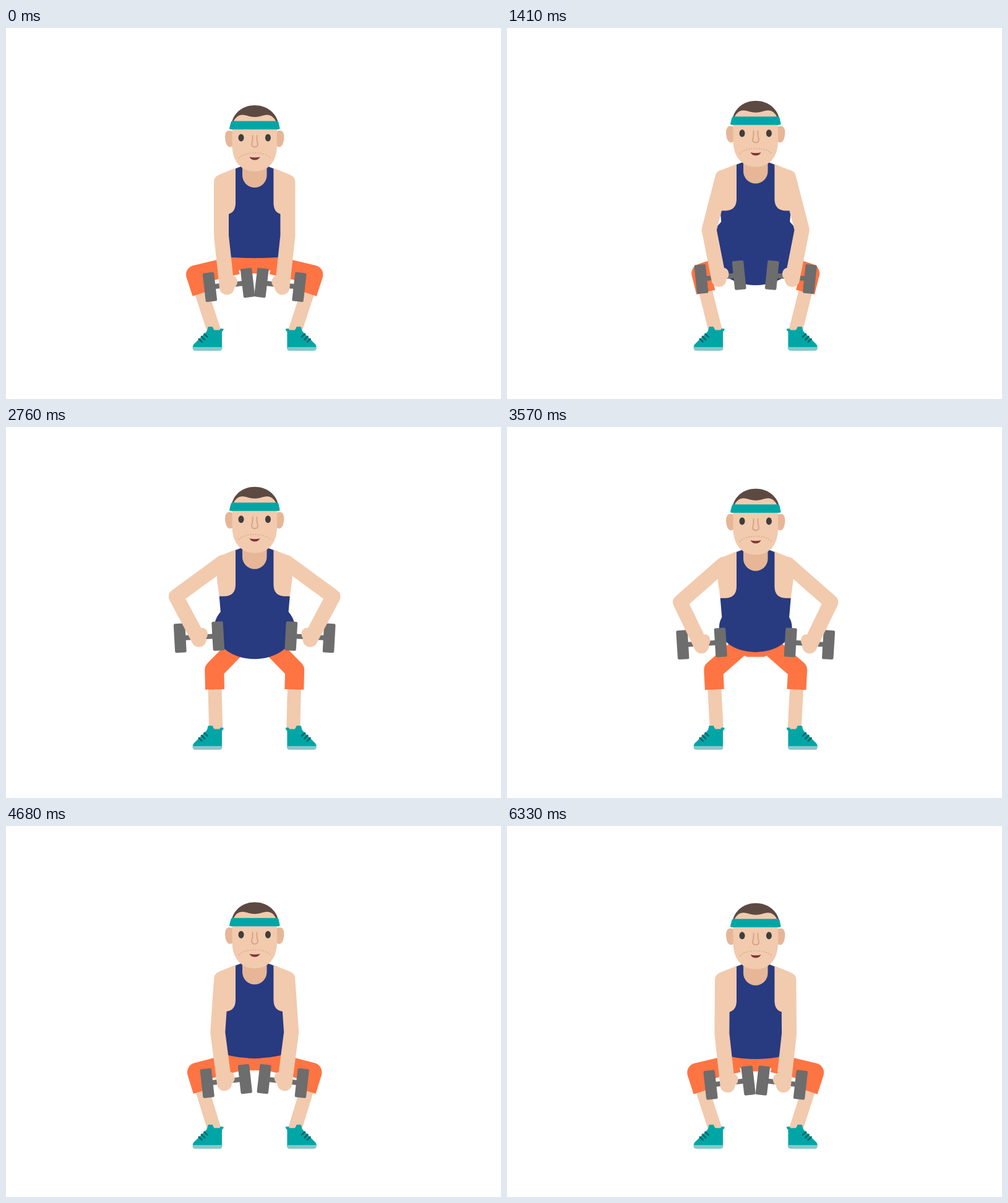
An HTML page with a canvas that plays this animation: 800 by 600 pixels, repeating every 6360 ms.

```html
<!DOCTYPE html>
<html lang="en">
<head>
<meta charset="utf-8">
<title>Squat and row</title>
<style>
html, body { margin: 0; width: 100%; height: 100%; overflow: hidden; background: #fff; }
canvas { display: block; }
</style>
</head>
<body>
<canvas id="stage" width="800" height="600"></canvas>
<script>
const ctx = document.getElementById('stage').getContext('2d');
const LOOP = 6360, REP = LOOP / 4, STEP = 30, AXIS = 401.7;
const SKIN = '#f2caae', SHADE = '#e6b697', NAVY = '#283a80', ORANGE = '#ff7443',
      TEAL = '#00a6a6', GREY = '#6d6d6d', HAIR = '#5c4a42';

// Eased 0 to 1 between times a and b
const ease = (t, a, b) => (1 - Math.cos(Math.PI * Math.min(1, Math.max(0, (t - a) / (b - a))))) / 2;
// Parabola through three poses: up (p = 0), middle (0.5), down (1)
const pose = (p, [up, mid, down]) =>
  up * (1 - p) * (1 - 2 * p) + mid * 4 * p * (1 - p) + down * p * (2 * p - 1);
const point = (p, xs, ys) => [pose(p, xs), pose(p, ys)];

function fill(color, path) {
  ctx.fillStyle = color;
  ctx.fill(new Path2D(path));
}
function stroke(color, width, path, cap = 'round') {
  ctx.strokeStyle = color;
  ctx.lineWidth = width;
  ctx.lineCap = cap;
  ctx.lineJoin = 'round';
  ctx.stroke(new Path2D(path));
}
function ellipse(color, x, y, rx, ry) {
  ctx.fillStyle = color;
  ctx.beginPath();
  ctx.ellipse(x, y, rx, ry, 0, 0, 7);
  ctx.fill();
}
function box(color, x, y, w, h, r) {
  ctx.fillStyle = color;
  ctx.beginPath();
  ctx.roundRect(x, y, w, h, r);
  ctx.fill();
}
const line = (...points) => 'M' + points.join('L');

function shifted(dy, draw) {
  ctx.save();
  ctx.translate(0, dy);
  draw();
  ctx.restore();
}
function bothSides(draw) {
  draw();
  ctx.save();
  ctx.translate(2 * AXIS, 0);
  ctx.scale(-1, 1);
  draw();
  ctx.restore();
}

function leg(p, drop) {
  const hip = [374, 334 + drop];
  const knee = point(p, [357, 334, 306.5], [396, 393, 399]);
  const ankle = [341 - 4 * p, 492];
  const dx = ankle[0] - knee[0], dy = ankle[1] - knee[1], k = 31.5 / Math.hypot(dx, dy);
  const hem = [knee[0] + dx * k, knee[1] + dy * k];
  stroke(SKIN, 22, line(knee, ankle), 'butt');
  stroke(ORANGE, 31, line(hip, knee, hem), 'butt');
}

function shoe() {
  fill(TEAL, 'M302 517Q301 513 306 509L321 494Q326 490 326 485Q326 483 328 483H333Q334.5 483 334.5 485L336.5 488.5H345L347 486L351.5 486.5Q352 489 349 491V517Z');
  fill('#86c8ca', 'M301.5 516H349.5V518Q349 522 345 522H306Q302 522 301.5 518Z');
  stroke('#10666c', 2.8, 'M311.8 503L316.5 507.5M316 499L321 504M320.5 495L325.5 499.5');
}

function torso(belly) {
  const sag = 8 + 50 * Math.min(0, belly);
  bothSides(() => fill(SKIN, 'M402 170L371 177.5L345 188L340 200L341 226L345 256H402Z'));
  bothSides(() => fill(NAVY, `M402 174H382L371 178.5V234Q371 253 352 253H344.7L350 316Q350.5 320 355 ${320 + sag * .3}Q375 ${320 + sag} 402 ${320 + sag}Z`));
  ellipse(NAVY, AXIS, 295 + 18 * belly, 53 + 22.5 * belly, 33 + 30 * belly);
  box(SHADE, 382, 155, 39.5, 54, [0, 0, 19.75, 19.75]);
}

function arm(p, drop) {
  const shoulder = [pose(p, [352, 350, 348]), pose(p, [203, 198, 200]) + drop];
  const elbow = point(p, [258.5, 279.5, 348], [191.5, 282.5, 336]);
  const hand = point(p, [313, 314, 357], [249, 353.5, 419.5]);
  const grip = point(p, [313, 314.3, 360], [244, 349.5, 415.5]);
  ctx.save();
  ctx.translate(...grip);
  ctx.rotate(pose(p, [0, -3.5, -6.5]) * Math.PI / 180);
  box(GREY, -25, -4, 50, 8, 0);
  box(GREY, -40, -23.5, 18.5, 47, 2.5);
  box(GREY, 21.5, -23.5, 18.5, 47, 2.5);
  ctx.restore();
  stroke(SKIN, 24, line(shoulder, elbow, hand));
  ellipse(SKIN, grip[0] + 5.5, grip[1] - 5, 8.5, 10);
}

// Drawn with the top of the hair at y = 0
function head() {
  bothSides(() => fill(SHADE, 'M366 42Q354 37 354 52Q355 67 362 67.5L368 66Z'));
  fill(SKIN, 'M365.5 26H438V64C438 92 423 107 402 107S365.5 92 365.5 64Z');
  fill(HAIR, 'M365 27C369 11 384 0 402 0S435.5 11 439.5 27Z');
  fill(SKIN, 'M367 27Q373 15 382 15.5C390 16 394 19 402 19S414 16 422 15.5Q431 15 437 27Z');
  fill(TEAL, 'M366 25.5H438Q440 25.5 440.5 27.5L442.5 37Q442.5 39 440.5 39H363Q361 39 361 37L363.5 27.5Q364 25.5 366 25.5Z');
  bothSides(() => ellipse('#403d3b', 380, 52.5, 4.5, 6));
  stroke('#d9a486', 2, 'M398.5 49Q399 57 397 62Q397 67.5 402 67.5T407 62Q405 57 405.5 49');
  ctx.setLineDash([.1, 4]);
  stroke('#d9a688', 1.8, 'M376.5 85Q385 77 402 77T427.5 85');
  ctx.setLineDash([]);
  fill('#7f3538', 'M393.5 83.5Q402 85.5 410.5 83.5Q408 88.5 402 88.5Q396 88.5 393.5 83.5Z');
}

function render(t) {
  const phase = t % REP;
  const low = (1 + Math.cos(2 * Math.PI * phase / REP)) / 2;
  const p = (low - .02) / .98, drop = pose(p, [0, 23.5, 49]);
  const belly = t < 800 ? -.1 + 1.1 * ease(t, 0, 800) : 1 - ease(t, 800, 5000);
  const lift = 7 * (ease(t, 0, 750) - ease(t, 850, 1550));

  ctx.fillStyle = '#fff';
  ctx.fillRect(0, 0, 800, 600);
  bothSides(() => { leg(p, drop); shoe(); });
  shifted(drop, () => {
    bothSides(() => fill(ORANGE, 'M402 318H354L362 336L388 348H402Z'));
    torso(belly);
  });
  shifted(76 + drop - lift, head);
  bothSides(() => arm(p, drop));
}

let start;
function tick(now) {
  start ??= now;
  render(Math.floor((now - start) % LOOP / STEP) * STEP);
  requestAnimationFrame(tick);
}
requestAnimationFrame(tick);
</script>
</body>
</html>
```
